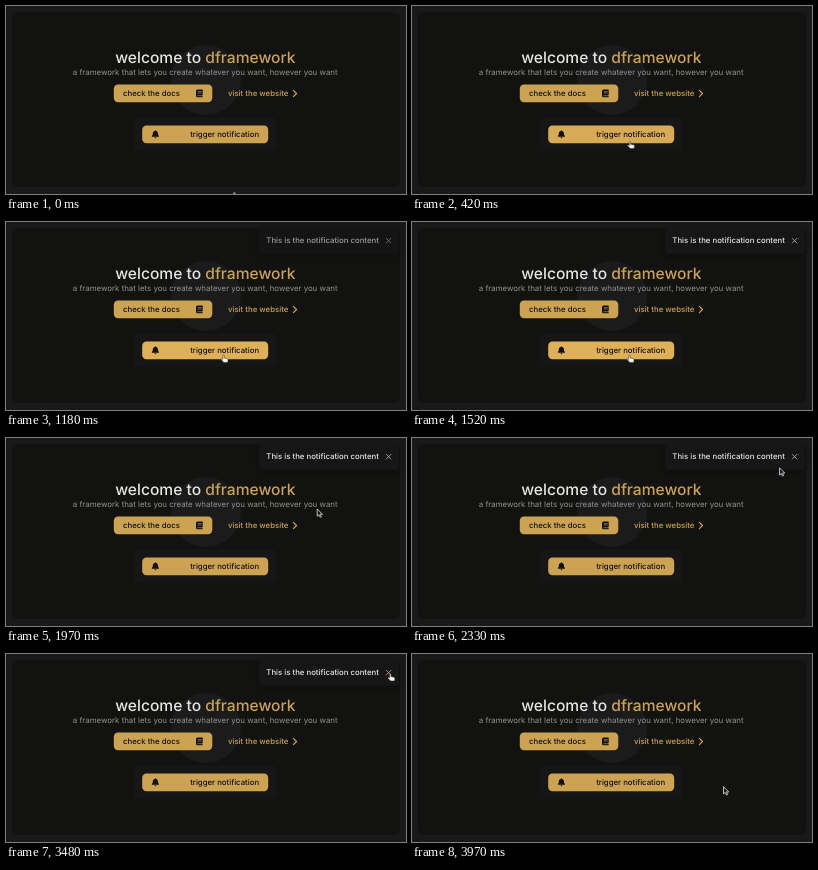
These frames come from a looping animation (400x188 px, 4000 ms). An HTML page:

```html
<!DOCTYPE html>
<html lang="en">
<head>
<meta charset="utf-8">
<title>Welcome page</title>
<style>
  html, body { margin: 0; width: 100%; height: 100%; overflow: hidden; background: #191919; }
  svg { display: block; width: 400px; height: 188px; }
  text { font: 500 7.79px Inter, sans-serif; fill: #e6e6e4; text-rendering: geometricPrecision; white-space: pre; }
  .title { font-size: 15.6px; }
  .sub { font-weight: 400; font-size: 7.87px; fill: #929290; }
  .gold { fill: #cca352; }
  .dark { fill: #12110e; }
  .line { fill: none; stroke-linecap: round; stroke-linejoin: round; }
  .cursor { stroke-linejoin: round; }
  #arrow { fill: #181818; stroke: #e4e4e4; stroke-width: .8; }
  #hand { fill: #f4f4f4; stroke: #222; stroke-width: .5; }
</style>
</head>
<body>
<svg viewBox="0 0 400 188">
  <defs>
    <filter id="soft" x="-20%" y="-60%" width="140%" height="240%">
      <feDropShadow dx="0" dy="1" stdDeviation="4" flood-opacity=".4"/>
    </filter>
  </defs>
  <rect x="6" y="6.5" width="388" height="174.5" rx="5" fill="#121211"/>
  <circle cx="200" cy="74" r="35" fill="#1b1b1b"/>

  <text class="title" x="109.2" y="57.2">welcome to <tspan class="gold">dframework</tspan></text>
  <text class="sub" x="66.8" y="68.6">a framework that lets you create whatever you want, however you want</text>

  <rect class="gold" x="107.8" y="78.5" width="98.5" height="17.7" rx="4.2"/>
  <text class="dark" x="117" y="90.2">check the docs</text>
  <path class="dark" d="M191.5 83.5h5.2v5.6h-.5v1.2h.5v.9h-5.2a1.5 1.5 0 0 1-1.5-1.5v-4.7a1.5 1.5 0 0 1 1.5-1.5z"/>
  <path class="line" stroke="#cca352" stroke-width=".6" d="M192.2 85.6h3M192.2 87h3M191.7 89.7h4"/>

  <text class="gold" x="222" y="90.2">visit the website</text>
  <path class="line" stroke="#cca352" stroke-width="1.2" d="M287.4 84.4l3.1 3.1-3.1 3.1"/>

  <rect x="128.5" y="111.5" width="141.5" height="33.5" rx="4" fill="#161616"/>
  <rect id="trigger" x="136.2" y="119.6" width="126" height="17.6" rx="4.2"/>
  <path class="dark" d="M149.4 124.3c.4 0 .6.3.6.7 1.3.3 2 1.3 2 2.6 0 1.3.3 1.9 1 2.6v.5h-7.2v-.5c.7-.7 1-1.3 1-2.6 0-1.3.7-2.3 2-2.6 0-.4.2-.7.6-.7zM148.4 131.2h2a1 1 0 0 1-2 0z"/>
  <text class="dark" x="184.2" y="131.2">trigger notification</text>

  <g id="note">
    <rect x="253" y="5.7" width="140" height="25.8" rx="4" fill="#191919" filter="url(#soft)"/>
    <text x="260.3" y="21.4">This is the notification content</text>
    <path id="close" class="line" stroke-width=".9" d="M380.3 16.4l4.6 4.6m0-4.6l-4.6 4.6"/>
  </g>

  <path id="arrow" class="cursor" d="M0 0v7.1l1.7-1.5 1.2 2.6 1.3-.6-1.2-2.5h2.3z"/>
  <path id="hand" class="cursor" d="M-.7.6c0-1 1.4-1 1.4 0v2.2l2.9.6c.8.2 1.1.6 1 1.4l-.4 2.4h-3.9l-2.5-2.6c-.5-.8.4-1.4 1-.9l.5.5z"/>
</svg>
<script>
const LOOP = 4000;
const $ = id => document.getElementById(id);
const clamp = v => Math.max(0, Math.min(1, v));
const ramp = (t, start, length) => clamp((t - start) / length);
const ease = u => u * u * (3 - 2 * u);
const mix = (a, b, u) => `rgb(${a.map((v, i) => v + (b[i] - v) * u)})`;

// time, x, y of the pointer tip
const path = [
  [0, 228, 186.5], [480, 217.5, 133.2], [1580, 217.5, 133.2],
  [1970, 311, 71.2], [2180, 343, 45], [2520, 386.3, 19.3],
  [2800, 386.3, 19.3], [3000, 384.3, 19.8], [3580, 384.3, 19.8],
  [3820, 358, 53], [3970, 311.5, 132.8], [4000, 311.5, 132.8]
];

// Smooth curve through the points, at rest wherever a coordinate turns or holds
function slope(i, k) {
  const a = path[i - 1], b = path[i], c = path[i + 1];
  if (!a || !c) return 0;
  const before = (b[k] - a[k]) / (b[0] - a[0]);
  const after = (c[k] - b[k]) / (c[0] - b[0]);
  return before * after > 0 ? 2 * before * after / (before + after) : 0;
}

function pointer(t) {
  const i = path.findIndex(p => p[0] > t) - 1;
  const a = path[i], b = path[i + 1], d = b[0] - a[0], u = (t - a[0]) / d;
  return [1, 2].map(k =>
    a[k] + (b[k] - a[k]) * ease(u) +
    d * u * (1 - u) * ((1 - u) * slope(i, k) - u * slope(i + 1, k)));
}

function draw(now) {
  const t = now % LOOP;
  const [x, y] = pointer(t);
  const overTrigger = x > 136 && x < 262 && y > 119 && y < 137;
  const overClose = t > 2860 && t < 3620;
  const onHand = overTrigger || overClose;

  const glow = ramp(t, 330, 150) - ramp(t, 1640, 150);
  $('trigger').style.fill = mix([204, 163, 82], [222, 177, 88], glow);
  $('close').style.stroke = mix([165, 165, 163], [204, 163, 82], ramp(t, 2860, 150));
  $('note').style.opacity = ease(ramp(t, 1000, 300)) - ease(ramp(t, 3550, 250));

  for (const id of ['arrow', 'hand']) {
    $(id).setAttribute('transform', `translate(${x} ${y})`);
    $(id).style.display = (id === 'hand') === onHand ? '' : 'none';
  }
}

const start = performance.now();
function frame() {
  draw(performance.now() - start);
  requestAnimationFrame(frame);
}
frame();
</script>
</body>
</html>
```
